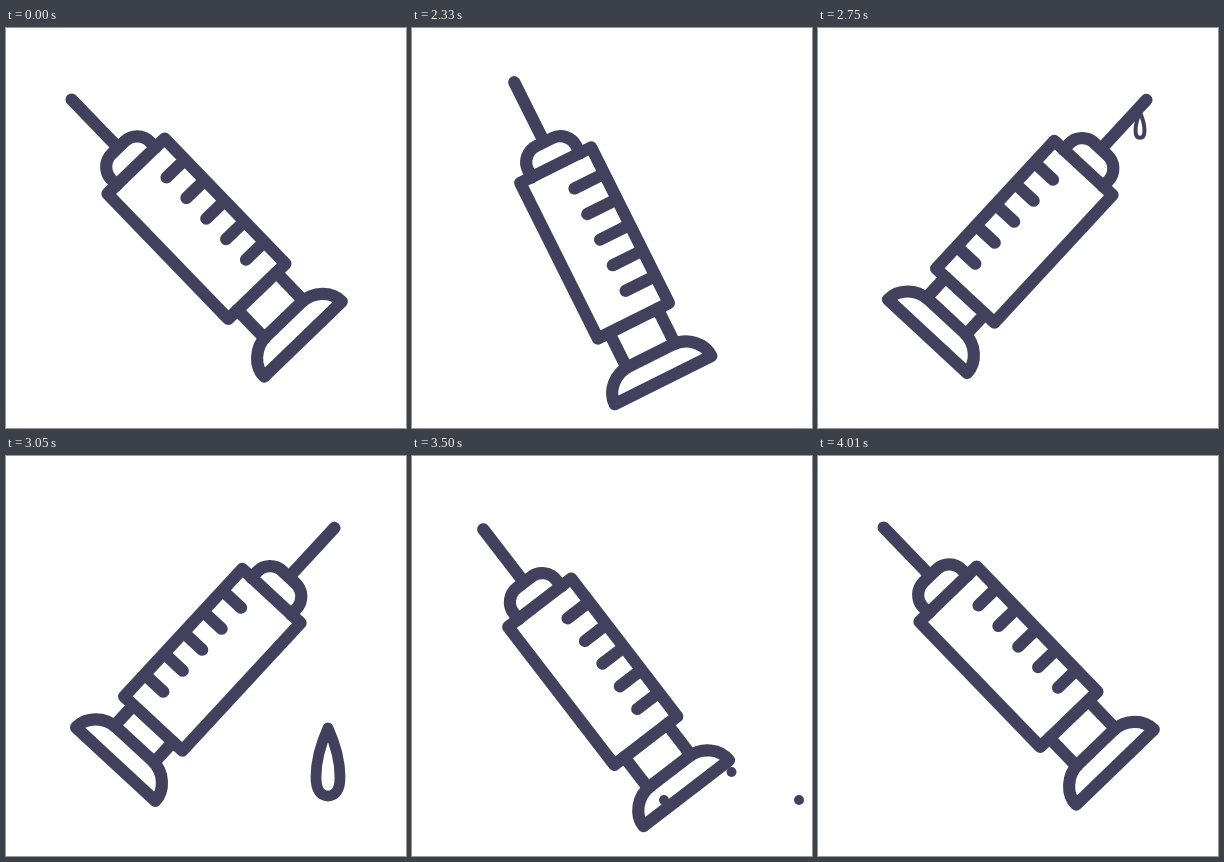
An HTML page that plays this animation: 400 px wide and 400 px high, repeating every 4040 ms.

```html
<!DOCTYPE html>
<html>
<head>
<meta charset="utf-8">
<title>Syringe</title>
<style>
  html, body { margin: 0; height: 100%; overflow: hidden; background: #fff; }
  svg { display: block; width: 100vw; height: 100vh; }
</style>
</head>
<body>
<svg viewBox="0 0 400 400" fill="none" stroke="#41415e" stroke-width="12.2" stroke-linecap="round" stroke-linejoin="round">
  <clipPath id="inside"><path d="M-39.7-99.3H39.7V74.7H-39.7Z"/></clipPath>
  <g id="syringe">
    <path id="needle" d="M0-192V-126"/>
    <path id="cap" d="M-27-99V-107A18 18 0 0 1-9-125H9A18 18 0 0 1 27-107V-99"/>
    <g clip-path="url(#inside)"><path id="marks"/></g>
    <path id="barrel" d="M-39.7-99.3H39.7V74.7H-39.7Z"/>
    <path id="rods"/>
    <path id="plunger" d="M-54 141C-54 127-41 113.5-24 113.5H24C41 113.5 54 127 54 141Z"/>
  </g>
  <path id="drop" stroke-width="10.8" d="M0 0C-5 11-12 31-12 49C-12 61-8 68 0 68S12 61 12 49C12 31 5 11 0 0Z"/>
  <g id="splash" fill="#41415e" stroke="none"><circle/><circle/><circle/></g>
</svg>
<script>
const LOOP = 4040, STEP = 30;
const $ = id => document.getElementById(id);
const clamp = u => Math.min(1, Math.max(0, u));
const place = (el, x, y, more = '') => el.setAttribute('transform', `translate(${x} ${y}) ${more}`);
const show = (el, on) => el.style.display = on ? '' : 'none';

let marks = '';
for (let i = 0; i < 5; i++) marks += `M-18 ${-70 + 28.6 * i}h36`;
$('marks').setAttribute('d', marks);

function draw(t) {
  // Progress from 0 to 1 between two times, eased at both ends.
  const ease = (from, to) => (1 - Math.cos(Math.PI * clamp((t - from) / (to - from)))) / 2;

  const windUp = ease(2000, 2185) - ease(3644, 3980);
  const swing = ease(2185, 2603) - ease(3080, 3644);
  const dip = ease(2000, 2180) - ease(2340, 2500) + ease(3180, 3520) - ease(3640, 3980);
  const turn = -44 - 8 * windUp + 94.8 * swing;
  place($('syringe'), 199 - swing - 10.7 * dip, 209.6 + 3.2 * swing + 15.5 * dip, `rotate(${turn})`);

  // The marks slide around the barrel as it turns.
  place($('marks'), -32.3 * Math.sin((2 * turn + 4) * Math.PI / 180), 0);

  const push = 11 * (ease(2600, 2760) - ease(3080, 3300));
  $('rods').setAttribute('d', `M-27 74.7V${113.5 - push}M27 74.7V${113.5 - push}`);
  place($('plunger'), 0, -push);

  const fall = Math.max(0, t - 2800);
  show($('drop'), t > 2700 && t < 3140);
  place($('drop'), 322, 84.5 + 0.003 * fall ** 2, `scale(${ease(2700, 2820)})`);

  const spread = Math.sin(clamp((t - 3140) / 360) * Math.PI / 2);
  show($('splash'), t >= 3140 && t < 3620);
  [...$('splash').children].forEach((dot, i) => {
    const side = i - 1;
    place(dot, 319.5 + 67.5 * side * spread, 405 - (89 - 28 * Math.abs(side)) * spread);
    dot.setAttribute('r', 5.5 * (1 - ease(3470, 3620)));
  });
}

const start = performance.now();
function tick() {
  const t = Math.max(0, performance.now() - start) % LOOP;
  draw(Math.floor((t - 20) / STEP) * STEP + 20);
  requestAnimationFrame(tick);
}
tick();
</script>
</body>
</html>
```
